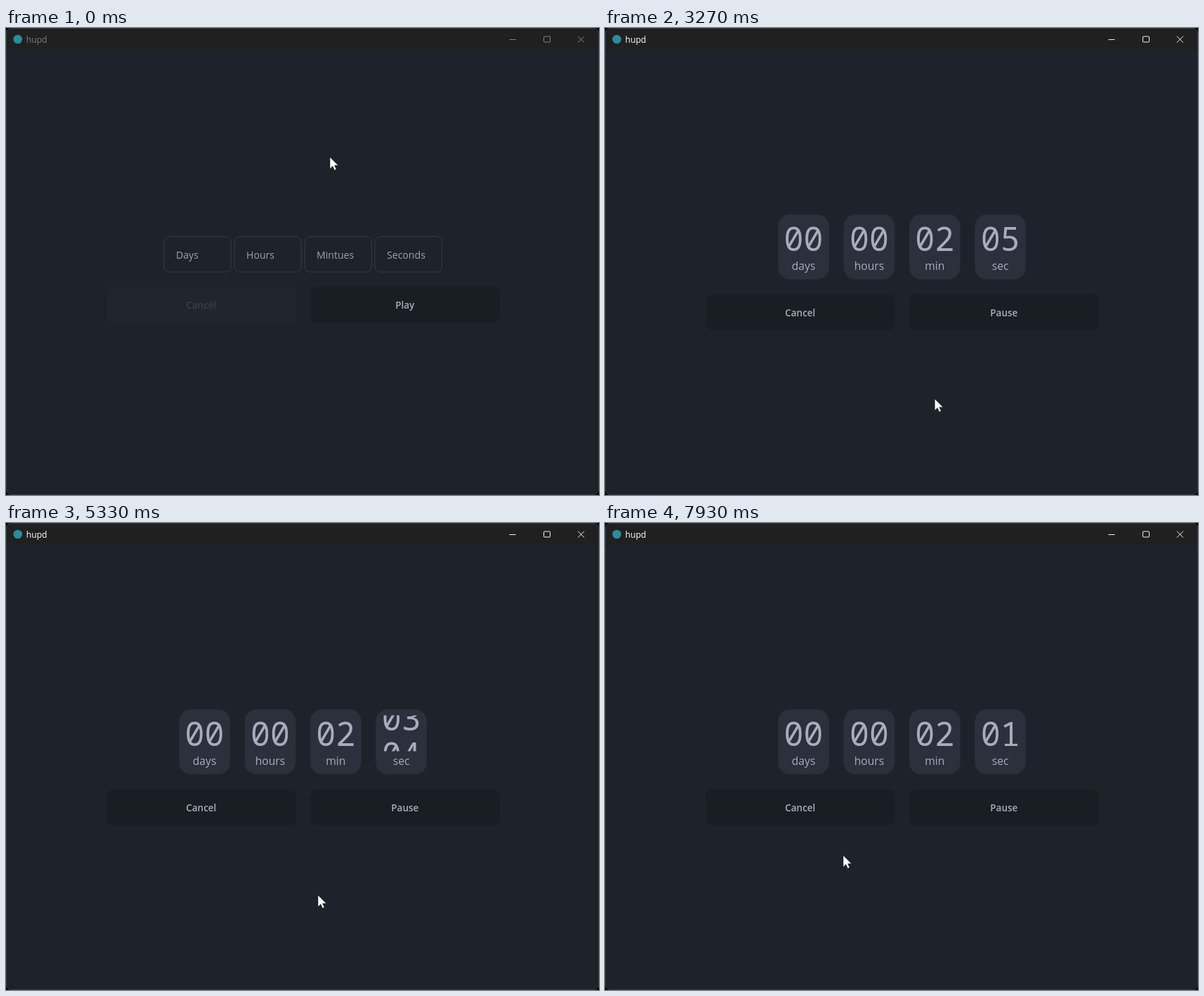
An HTML page that plays this animation: 844 px wide and 664 px high, repeating every 8 s.

```html
<!DOCTYPE html>
<html lang="en">
<head>
<meta charset="utf-8">
<title>Countdown</title>
<style>
  html, body { margin: 0; width: 100%; height: 100%; overflow: hidden; background: #000; }
  svg { display: block; width: 844px; height: 664px; cursor: default; }
  text { font-family: "Open Sans", "Noto Sans", sans-serif; fill: #a6adbb; white-space: pre; }
  .title { font-size: 12.2px; }
  .field text { font-size: 14.1px; }
  .field .hint { fill: #9ca3af; }
  .btn text { font-size: 13.5px; font-weight: 600; text-anchor: middle; }
  .btn rect { fill: #191e24; }
  .btn.hover rect { fill: #15191f; }
  .btn.off rect { fill: #20262e; }
  .btn.off text { fill: #383f47; }
  .btn { transform-box: fill-box; transform-origin: center; }
  .btn.down { transform: scale(.987); }
  .card rect { fill: #2a303c; }
  .card text { text-anchor: middle; font-size: 15.7px; }
  .card .num { font: 46.7px "Noto Sans Mono", "DejaVu Sans Mono", monospace; }
  .line { fill: none; stroke: #353c44; }
  .ring { fill: none; stroke: #3c434c; stroke-width: 2; }
  .spin path { fill: #9f9f9f; stroke: #9f9f9f; stroke-width: 2; stroke-linejoin: round; }
  .spin .bar { fill: #2c2b2a; stroke: none; }
  .white { fill: #fff; stroke: #111; stroke-width: .6; }
</style>
</head>
<body>
<svg viewBox="0 0 844 664">
  <defs>
    <clipPath id="slot"><rect x="530" y="273.4" width="66" height="51"/></clipPath>
    <clipPath id="win"><rect width="844" height="664" rx="8"/></clipPath>
  </defs>
  <g clip-path="url(#win)">
    <rect width="844" height="664" fill="#1d232a"/>
    <rect width="844" height="31.5" fill="#202020"/>
  </g>
  <rect x=".5" y=".5" width="843" height="663" rx="7.5" fill="none" stroke="#363839"/>
  <circle cx="16.8" cy="16" r="6.3" fill="#2a8c9c"/>
  <text id="title" class="title" x="28.7" y="20.8">hupd</text>
  <path id="controls" fill="none" d="M716.5 16.5h9M766.5 12h7q1 0 1 1v6q0 1-1 1h-7q-1 0-1-1v-6q0-1 1-1zM814 11.7l9 9m0-9l-9 9"/>

  <g id="form"></g>
  <g id="clock"></g>

  <g id="cursor">
    <path id="arrow" class="white" d="M0 0V16.8L3.9 13.1 6.5 18.8 9.2 17.6 6.7 12H12z"/>
    <path id="beam" fill="none" stroke="#fff" stroke-width="1.5" d="M-5 -7.3h3.5q1.5 0 1.5 1.3q0-1.3 1.5-1.3h3.5M0-6.5V6M-5 6.8h10"/>
    <path id="hand" class="white" d="M-2 1.5Q-2 0 -.5 0T1 1.5V7Q3.7 6 4.3 8Q6.4 7.2 7 9Q9 8.6 9 11V15Q9 17 7.5 18.5V21H-.8V18.8L-5.8 12.6Q-6.6 11 -5 10.2T-2 12.3z"/>
  </g>
</svg>
<script>
const $ = id => document.getElementById(id);
const show = (el, on) => { el.style.display = on ? "" : "none"; };
const LOOP = 8000, STEP = 200 / 3;

const button = (id, x, y, label) => `<g class="btn" id="${id}">
  <rect x="${x}" y="${y}" width="269.3" height="51" rx="8.5"/>
  <text x="${x + 134.4}" y="${y + 30.9}">${label}</text></g>`;

const field = (label, i) => {
  const x = 225 + 100 * i;
  return `<g class="field">
    <g class="spin">
      <path class="bar" d="M${x + 79.5} 297h7.5q8 0 8 8v33.500q0 8-8 8h-7.500z"/>
      <path d="M${x + 81} 311.500l6-8 6 8zM${x + 81} 332l6 8 6-8z"/>
    </g>
    <rect class="line" x="${x}" y="296.5" width="95.4" height="50.5" rx="8"/>
    <rect class="ring" x="${x - 2.5}" y="294" width="100.4" height="55.5" rx="10.500"/>
    <text x="${x + 17}" y="327.800">${label}</text>
    <path class="caret" stroke="#a6adbb" d="M0 313v18.500"/></g>`;
};

const card = (label, i) => {
  const mid = 282.6 + 93.35 * i;
  const number = i === 3
    ? `<g clip-path="url(#slot)"><g id="reel">${[0, 1, 2, 3, 4, 5, 6].map(n =>
        `<text class="num" x="${mid}" y="${317 + 51 * n}">0${n}</text>`).join("")}</g></g>`
    : `<text class="num" x="${mid}" y="317">${i === 2 ? "02" : "00"}</text>`;
  return `<g class="card"><rect x="${mid - 36.3}" y="265" width="72.600" height="92.500" rx="17"/>
    ${number}<text x="${mid}" y="343.500">${label}</text></g>`;
};

const hints = ["Days", "Hours", "Mintues", "Seconds"];
$("form").innerHTML = hints.map(field).join("") +
  button("reset", 143.4, 368, "Cancel") + button("play", 433.4, 368, "Play");
$("clock").innerHTML = ["days", "hours", "min", "sec"].map(card).join("") +
  button("cancel", 143.4, 378.7, "Cancel") + button("pause", 433.4, 378.7, "Pause");
$("reset").classList.add("off");

const fields = [...document.querySelectorAll(".field")].map((el, i) => ({
  x: 225 + 100 * i,
  spin: el.querySelector(".spin"),
  ring: el.querySelector(".ring"),
  text: el.querySelector("text"),
  caret: el.querySelector(".caret")
}));

// Pointer path: time, x, y
const path = [
  [0, 461, 183.5], [130, 464, 200], [330, 468, 236], [600, 455, 300], [800, 447, 325],
  [1130, 447, 325], [1260, 557, 328.5], [1900, 557, 328.5], [2200, 296, 384],
  [2400, 480, 384], [2530, 583.5, 393], [2860, 583.5, 393], [3260, 470, 527],
  [3460, 447, 531], [3930, 444, 529], [5660, 444, 529], [6200, 444, 528],
  [6860, 464, 527], [7070, 464, 527], [7330, 540, 515], [7530, 641, 500],
  [7730, 600, 491], [7867, 548, 485], [7933, 339, 472.5]
];

function pointer(t) {
  const i = path.findIndex(p => p[0] > t);
  if (i < 0) return path[path.length - 1].slice(1);
  const [a, b] = [path[i - 1], path[i]], k = (t - a[0]) / (b[0] - a[0]);
  return [a[1] + (b[1] - a[1]) * k, a[2] + (b[2] - a[2]) * k];
}

// cubic-bezier(1, 0, 0, 1) in closed form
const flip = k => {
  const s = 0.5 + Math.cbrt((k - 0.5) / 4);
  return s * s * (3 - 2 * s);
};

const inside = (x, y, left, top, w) => x >= left && x <= left + w && y >= top && y <= top + 51;

function render(now) {
  const t = Math.floor((now % LOOP + 3.4) / STEP) * STEP;
  const [x, y] = pointer(t);
  const running = t >= 2795, active = t >= 925;
  const focus = t < 925 || t >= 2660 ? -1 : t < 1595 ? 2 : 3;
  const values = ["", "", t >= 1130 ? "2" : "", t >= 1860 ? "5" : ""];
  const caretFrom = t < 1130 ? 925 : t < 1595 ? 1130 : t < 1860 ? 1595 : 1860;

  $("title").style.fill = active ? "#fff" : "#7d7d7d";
  $("controls").style.stroke = active ? "#f4f4f4" : "#858585";
  show($("form"), !running);
  show($("clock"), running);

  let shape = "arrow";
  fields.forEach((f, i) => {
    const hover = !running && inside(x, y, f.x, 296, 95.5);
    if (hover) shape = "beam";
    show(f.spin, hover || i === focus);
    show(f.ring, i === focus);
    f.text.textContent = values[i] || hints[i];
    f.text.setAttribute("class", values[i] ? "" : "hint");
    show(f.caret, i === focus && (t - caretFrom) % 1060 < 530);
    f.caret.setAttribute("transform", `translate(${f.x + (values[i] ? 25.5 : 17.5)} 0)`);
  });

  const overPlay = !running && inside(x, y, 433.4, 368, 269.3);
  const overPause = running && inside(x, y, 433.4, 378.7, 269.3);
  if (overPlay || overPause) shape = "hand";
  $("play").classList.toggle("hover", overPlay);
  $("play").classList.toggle("down", t >= 2660);
  $("pause").classList.toggle("hover", overPause);

  const ticks = Math.max(0, (t - 3833) / 1000), whole = Math.floor(ticks);
  const value = 5 - whole - (ticks > 0 ? flip(ticks - whole) : 0);
  $("reel").setAttribute("transform", `translate(0 ${-51 * value})`);

  for (const id of ["arrow", "beam", "hand"]) show($(id), id === shape);
  $("cursor").setAttribute("transform", `translate(${x} ${y})`);
}

const start = performance.now();
function loop() {
  render(performance.now() - start);
  requestAnimationFrame(loop);
}
loop();
</script>
</body>
</html>
```
